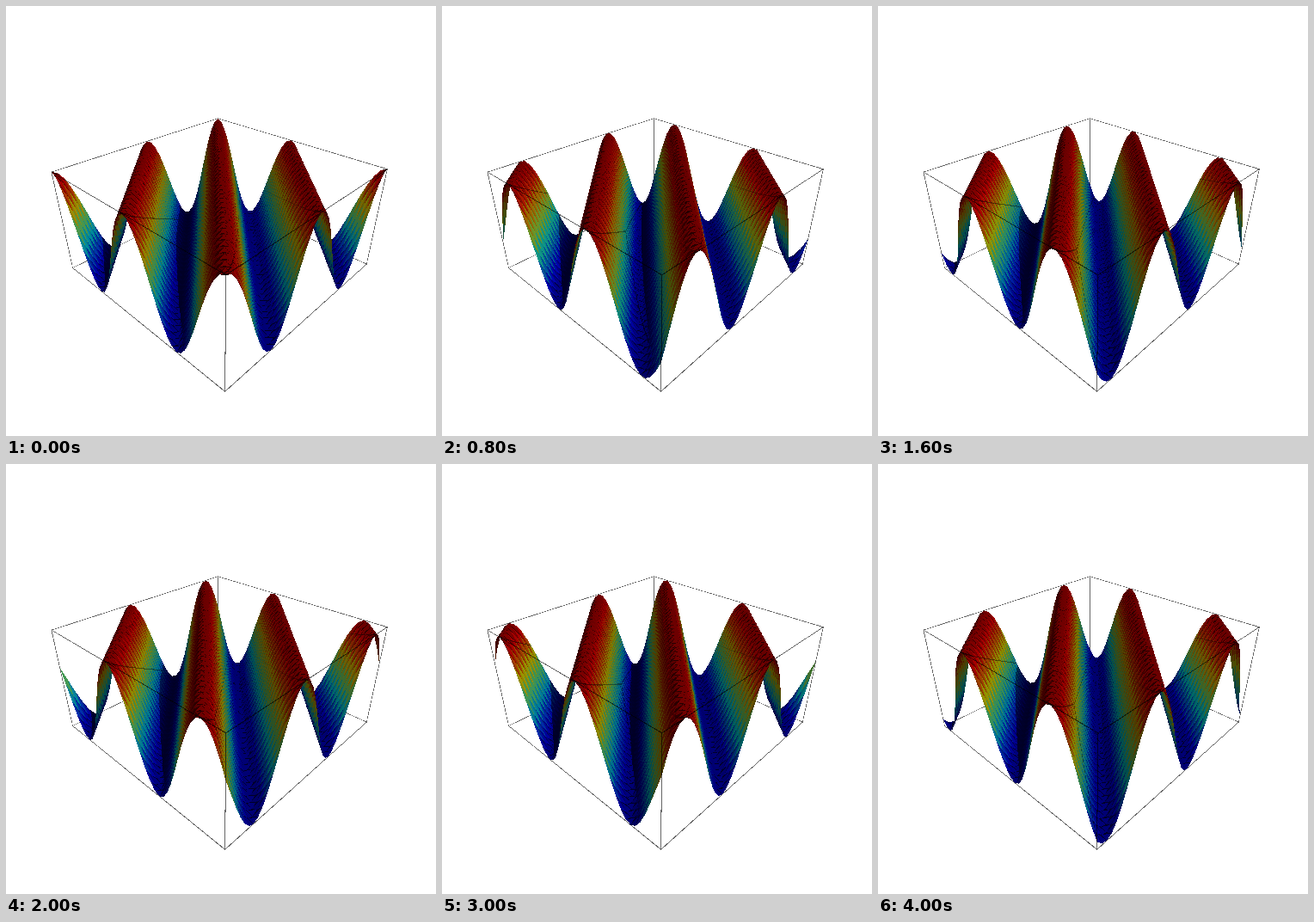
Write a matplotlib script that moves like this. It is 500x500 px and loops after 4200 ms.

```python
import numpy as np
import matplotlib.pyplot as plt
from matplotlib.animation import FuncAnimation

SIZE, FRAMES, INTERVAL = 500, 21, 200
CELLS = 40                      # grid cells per side of the square domain [-1, 1]
STEP = 2 / CELLS
HEIGHT = 0.5
AMBIENT, DIFFUSE = 0.3, 0.7
EDGE_RADIUS, EDGE_OPACITY = 0.0028, 0.6
EYE = np.array([2.3, 2.4, 2.0], np.float32)
LIGHT = np.array([4.0, 3.0, 2.0], np.float32)


def camera_rays():
    """Unit-depth ray direction for every pixel."""
    forward = -EYE / np.linalg.norm(EYE)
    right = np.cross([0, 0, 1], forward)
    right /= np.linalg.norm(right)
    up = np.array([0, 0, 1]) - forward[2] * forward
    up /= np.linalg.norm(up)
    row, col = np.mgrid[0:SIZE, 0:SIZE]
    across = (col + 1) / SIZE - 0.5
    above = 0.5 - row / SIZE
    rays = forward + across[..., None] * right + above[..., None] * up
    return rays.reshape(-1, 3).astype(np.float32)


def facet(x, y):
    """Grid diagonal, the two barycentric weights, and which triangle of the cell."""
    gx, gy = (x + 1) / STEP, (y + 1) / STEP
    i = np.clip(np.floor(gx), 0, CELLS - 1)
    j = np.clip(np.floor(gy), 0, CELLS - 1)
    a, b = gx - i, gy - j
    far = a + b > 1
    return i - j, np.where(far, 1 - b, a), np.where(far, 1 - a, b), far


def wave_parts(x, y):
    """Cosine and sine components of the faceted plane wave."""
    m, w1, w2, _ = facet(x, y)
    k = 2 * np.pi * STEP
    table = np.arange(-CELLS - 1, CELLS + 2) * k
    n = m.astype(np.int32) + CELLS + 1
    parts = []
    for wave in (np.cos(table), np.sin(table)):
        wave = wave.astype(np.float32)
        mid = wave[n]
        parts.append((mid + w1 * (wave[n + 1] - mid)
                      + w2 * (wave[n - 1] - mid)).astype(np.float32))
    return parts


def box_edges():
    """Each edge as (axis, the other two axes, their fixed coordinates)."""
    half = (1, 1, HEIGHT)
    for axis in range(3):
        u, v = [k for k in range(3) if k != axis]
        for su in (-1, 1):
            for sv in (-1, 1):
                yield axis, u, v, su * half[u], sv * half[v]


def edge_hit(origin, rays, edge):
    """Ray parameter nearest to an edge, infinite where the rod is missed."""
    axis, u, v, cu, cv = edge
    ou, ov = cu - origin[..., u], cv - origin[..., v]
    du, dv = rays[:, u], rays[:, v]
    length = du * du + dv * dv
    t = (ou * du + ov * dv) / length
    gap = np.abs(ou * dv - ov * du) / np.sqrt(length)
    limit = HEIGHT if axis == 2 else 1
    along = np.abs(origin[..., axis] + t * rays[:, axis])
    return np.where((gap < EDGE_RADIUS) & (along <= limit + EDGE_RADIUS), t, np.inf)


def jet(v):
    """Dark blue to dark red for v in [0, 1]."""
    return np.clip(1.5 - np.abs(4 * v[:, None] - np.array([3, 2, 1])), 0, 1)


rays = camera_rays()
edge_depth = np.min([edge_hit(EYE, rays, e) for e in box_edges()], axis=0)

# Clip the rays to the box and sample the wave components once along each.
half_box = np.array([1, 1, HEIGHT], np.float32)
slab_a, slab_b = (-half_box - EYE) / rays, (half_box - EYE) / rays
enter = np.minimum(slab_a, slab_b).max(axis=1)
leave = np.maximum(slab_a, slab_b).min(axis=1)
inside = np.flatnonzero(leave > enter)
rays_in, enter, leave = rays[inside], enter[inside], leave[inside]
SAMPLES = 96
span = (leave - enter) / (SAMPLES - 1)
ray_z = np.empty((SAMPLES, len(inside)), np.float32)
cos_part, sin_part = np.empty_like(ray_z), np.empty_like(ray_z)
for s in range(SAMPLES):
    p = EYE + (enter + s * span)[:, None] * rays_in
    ray_z[s] = p[:, 2]
    cos_part[s], sin_part[s] = wave_parts(p[:, 0], p[:, 1])


def lit(points, c, s):
    """False where the surface or a box edge hides the light."""
    to_light = LIGHT - points
    reach = np.min((half_box - points) / to_light, axis=1)
    clear = np.ones(len(points), bool)
    for q in np.linspace(0, 1, 33)[1:] ** 1.5:
        live = np.flatnonzero(clear)
        p = points[live] + (np.float32(q) * reach[live])[:, None] * to_light[live]
        pc, ps = wave_parts(p[:, 0], p[:, 1])
        clear[live] = p[:, 2] > c * pc + s * ps - 0.002
    for edge in ((0, 1, 2, 1, HEIGHT), (1, 0, 2, 1, HEIGHT), (2, 0, 1, 1, 1)):
        t = edge_hit(points, to_light, edge)
        clear &= ~((t > 0.002) & (t < 1))
    return clear


def render(phase):
    grid_phase = np.arange(-CELLS, CELLS + 1) * 2 * np.pi * STEP
    amp = HEIGHT / np.abs(np.cos(grid_phase - phase)).max()
    c, s = np.float32(amp * np.cos(phase)), np.float32(amp * np.sin(phase))

    gap = ray_z - c * cos_part - s * sin_part
    from_above = gap[0] > 0
    crossed = (gap > 0) != from_above
    k = crossed.argmax(axis=0)
    hit = np.flatnonzero(k > 0)
    k = k[hit]
    g0, g1 = gap[k - 1, hit], gap[k, hit]
    lo, hi = enter[hit] + (k - 1) * span[hit], enter[hit] + k * span[hit]
    for _ in range(3):
        t = lo + (hi - lo) * g0 / (g0 - g1)
        p = EYE + t[:, None] * rays_in[hit]
        pc, ps = wave_parts(p[:, 0], p[:, 1])
        g = p[:, 2] - c * pc - s * ps
        same = (g > 0) == (g0 > 0)
        lo, g0 = np.where(same, t, lo), np.where(same, g, g0)
        hi, g1 = np.where(same, hi, t), np.where(same, g1, g)
        g1 = np.where(g0 == g1, g1 + 1e-6, g1)
    p = (EYE + t[:, None] * rays_in[hit]).astype(np.float32)

    m, _, _, far = facet(p[:, 0], p[:, 1])
    wave = [amp * np.cos((m + d) * 2 * np.pi * STEP - phase) for d in (-1, 0, 1)]
    rise, fall = (wave[2] - wave[1]) / STEP, (wave[0] - wave[1]) / STEP
    normal = np.stack([np.where(far, -fall, rise), np.where(far, -rise, fall),
                       -np.ones(len(m))], axis=1)
    normal /= np.linalg.norm(normal, axis=1, keepdims=True)
    normal *= -np.sign((normal * rays_in[hit]).sum(axis=1, keepdims=True))

    to_light = LIGHT - p
    slant = (normal * to_light).sum(axis=1) / np.linalg.norm(to_light, axis=1)
    facing = np.flatnonzero(slant > 0)
    shade = np.full(len(p), AMBIENT)
    shade[facing] += DIFFUSE * slant[facing] * lit(p[facing], c, s)

    image = np.ones((SIZE * SIZE, 3))
    depth = np.full(SIZE * SIZE, 1e3)
    image[inside[hit]] = jet(0.5 + wave[1] / (2 * HEIGHT)) * shade[:, None]
    depth[inside[hit]] = t
    image[edge_depth < depth + 0.002] *= 1 - EDGE_OPACITY
    return (255 * image).astype(np.uint8).reshape(SIZE, SIZE, 3)


fig = plt.figure(figsize=(5, 5), dpi=100, facecolor="white")
picture = fig.figimage(np.full((SIZE, SIZE, 3), 255, np.uint8), origin="upper")
cache = {}


def update(i):
    if i not in cache:
        cache[i] = render(0.5 * i)
    picture.set_data(cache[i])
    return [picture]


anim = FuncAnimation(fig, update, frames=FRAMES, interval=INTERVAL,
                     repeat=True, repeat_delay=0, blit=False)
plt.show()
```
